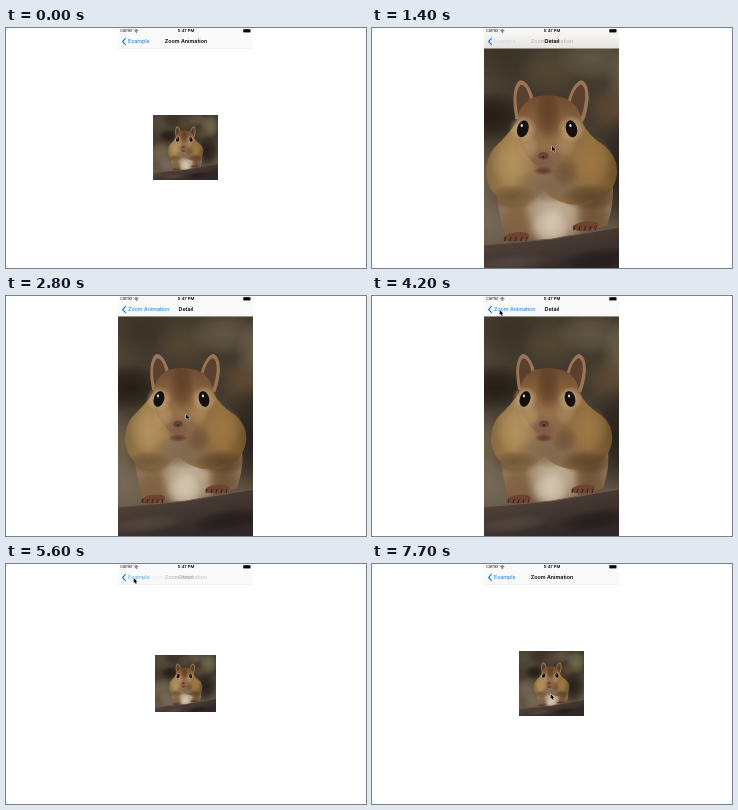
Write an HTML page with a canvas that moves like this. It is 360 by 240 pixels and loops after 8000 ms.

```html
<!DOCTYPE html>
<html lang="en">
<head>
<meta charset="utf-8">
<title>Zoom Animation</title>
<style>
html, body { margin: 0; width: 100%; height: 100%; overflow: hidden; background: #fff; }
canvas { display: block; width: 360px; height: 240px; }
</style>
</head>
<body>
<canvas id="stage"></canvas>
<script>
const W = 360, H = 240, LOOP = 8000, STEP = 700;
const canvas = document.getElementById('stage');
const c = canvas.getContext('2d');
const dpr = window.devicePixelRatio || 1;
canvas.width = W * dpr;
canvas.height = H * dpr;

const FONT = 'Inter, Roboto, "Liberation Sans", sans-serif';
const BLUE = '#0a7aee';

function oval(x, y, rx, ry, fill, turn = 0) {
  c.fillStyle = fill;
  c.beginPath();
  c.ellipse(x, y, rx, ry, turn, 0, Math.PI * 2);
  c.fill();
}

// Soft spot: rgb fading to transparent at the rim
function glow(x, y, rx, ry, rgb, a = 1, turn = 0) {
  c.save();
  c.translate(x, y);
  c.rotate(turn);
  c.scale(rx, ry);
  const g = c.createRadialGradient(0, 0, 0, 0, 0, 1);
  g.addColorStop(0, `rgba(${rgb},${a})`);
  g.addColorStop(0.55, `rgba(${rgb},${a * 0.65})`);
  g.addColorStop(1, `rgba(${rgb},0)`);
  c.fillStyle = g;
  c.fillRect(-1, -1, 2, 2);
  c.restore();
}

function shape(path, fill) {
  c.fillStyle = fill;
  c.fill(new Path2D(path));
}

function fade(x0, y0, x1, y1, ...stops) {
  const g = c.createLinearGradient(x0, y0, x1, y1);
  stops.forEach((s, i) => g.addColorStop(i / (stops.length - 1), s));
  return g;
}

function backdrop() {
  c.fillStyle = fade(0, 20, 0, 240, '#443b2f', '#43392d', '#5a4e3e', '#6a5d4c');
  c.fillRect(69, 19, 222, 222);
  glow(85, 45, 60, 45, '88,82,60', 0.7);
  glow(135, 34, 38, 28, '58,50,38', 0.9);
  glow(178, 48, 30, 24, '88,74,54', 0.7);
  glow(218, 38, 36, 22, '104,92,74', 0.8);
  glow(262, 58, 34, 40, '122,118,84', 0.8);
  glow(124, 92, 36, 24, '34,27,20', 0.9);
  glow(238, 84, 26, 24, '98,74,52', 0.8);
  glow(250, 142, 44, 54, '38,32,27', 1);
  glow(96, 150, 44, 40, '120,108,82', 0.8);
  glow(118, 188, 34, 30, '124,110,92', 0.8);
}

function log() {
  shape('M69 218 L112 211 L180 205 L247 193 L291 185 V241 H69Z',
    fade(170, 200, 180, 241, '#4e4038', '#40342f', '#302827'));
  c.strokeStyle = '#6b5a4e';
  c.lineWidth = 1;
  c.stroke(new Path2D('M69 218 L112 211 L180 205 L247 193 L291 185'));
  glow(140, 228, 40, 9, '96,84,76', 0.5, -0.12);
  glow(222, 224, 40, 11, '32,25,23', 0.7, -0.15);
}

function ear(x, turn) {
  c.save();
  c.translate(x, 73);
  c.rotate(turn);
  shape('M-9 20 Q-11 -8 -2 -15 Q5 -16 9 -1 Q11 12 9 22Z', '#9a7555');
  shape('M-6 16 Q-8 -5 -1 -11 Q4 -11 6 1 Q7 12 6 18Z', '#59402f');
  c.restore();
}

function eye(x, y, turn) {
  glow(x, y, 13, 13, '196,165,122', 0.95);
  oval(x, y, 5.2, 8, '#14100f', turn);
  oval(x - 1, y - 3, 1.1, 1.4, '#d9d6d0');
}

function paw(x, y) {
  oval(x, y, 12, 4.3, '#6d4430', -0.12);
  c.strokeStyle = '#33201a';
  c.lineWidth = 1;
  for (let i = -2; i < 3; i++) {
    c.beginPath();
    c.moveTo(x + i * 5, y);
    c.lineTo(x + i * 5 - 1, y + 4);
    c.stroke();
  }
}

function animal() {
  // Trunk, pale chest and forelegs
  shape('M126 145 Q130 180 137 204 L162 207 L206 200 L231 192 Q240 165 234 145Z',
    fade(0, 150, 0, 207, '#87694a', '#8f7456', '#75593f'));
  glow(182, 183, 30, 34, '202,188,165', 0.95);
  glow(178, 194, 18, 18, '220,208,188', 0.7);
  glow(146, 190, 15, 24, '128,98,64', 0.9);
  glow(218, 182, 17, 24, '112,82,54', 0.95);

  // Cheek pouches around the muzzle
  shape('M148 96 Q138 110 126 121 Q119 130 119 144 Q120 163 138 172 Q157 176 172 160 ' +
    'Q188 176 213 173 Q236 168 240 146 Q242 130 229 119 Q214 110 207 96Z',
    fade(119, 0, 242, 0, '#86693f', '#a28250', '#96754c', '#8d6b42', '#93703e', '#6b4e2a'));
  glow(143, 134, 20, 25, '184,150,100', 0.75);
  glow(217, 132, 20, 22, '160,122,70', 0.75);
  glow(178, 156, 38, 17, '126,104,80', 0.85);
  glow(143, 166, 24, 12, '96,74,48', 0.75);
  glow(216, 166, 28, 13, '82,59,37', 0.8);
  glow(192, 143, 14, 14, '104,78,54', 0.7);

  ear(153, -0.1);
  ear(205, 0.22);

  // Head
  shape('M147 104 Q146 83 162 74 Q179 69 195 76 Q210 86 207 105 Q203 121 187 135 ' +
    'Q175 145 162 134 Q149 121 147 104Z',
    fade(0, 70, 0, 142, '#6c4a30', '#85603c', '#94704a', '#806148'));
  glow(176, 90, 13, 25, '88,56,34', 0.75);
  glow(157, 119, 11, 14, '180,146,100', 0.85);
  glow(193, 117, 11, 13, '170,134,90', 0.85);
  eye(153, 103, 0.3);
  eye(198, 103, -0.25);
  glow(172, 134, 11, 13, '128,90,70', 0.9);
  oval(172, 128, 5, 3.6, '#684438');
  oval(172, 129, 1.2, 0.9, '#321c19');
  glow(172, 142, 10, 4, '78,52,40', 0.8);
}

// Square picture 220 wide in its own space, zoomed about its middle
function photo(cy, scale, x, y, w, h) {
  c.save();
  c.beginPath();
  c.rect(x, y, w, h);
  c.clip();
  c.translate(179.5, cy);
  c.scale(scale, scale);
  c.translate(-179.5, -130);
  backdrop();
  animal();
  log();
  paw(147, 203);
  paw(211, 193);
  c.restore();
}

function text(str, x, y, size, color, weight = 400, align = 'left', alpha = 1) {
  c.globalAlpha = alpha;
  c.font = `${weight} ${size}px ${FONT}`;
  c.textAlign = align;
  c.textBaseline = 'alphabetic';
  c.fillStyle = color;
  c.fillText(str, x, y);
  c.globalAlpha = 1;
}

const title = (str, alpha = 1, x = 180) => text(str, x, 15.4, 5.35, '#000', 600, 'center', alpha);
const back = (str, alpha = 1, x = 122) => text(str, x, 15.4, 5.4, BLUE, 400, 'left', alpha);

function chevron(alpha = 1) {
  c.globalAlpha = alpha;
  c.strokeStyle = BLUE;
  c.lineWidth = 1.1;
  c.stroke(new Path2D('M119.7 10.2 L116.6 13.5 L119.7 16.8'));
  c.globalAlpha = 1;
}

function bar(fill = '#f9f9f9') {
  c.fillStyle = fill;
  c.fillRect(112, 0, 135, 20);
  c.fillStyle = '#e3e3e3';
  c.fillRect(112, 20, 135, 0.5);
  text('Carrier', 114, 4.3, 3.8, '#111');
  text('5:47 PM', 180, 4.3, 4.1, '#000', 600, 'center');
  c.strokeStyle = '#111';
  c.lineWidth = 0.7;
  for (const r of [1.4, 2.7]) {
    c.beginPath();
    c.arc(130.3, 4.5, r, -Math.PI * 0.76, -Math.PI * 0.24);
    c.stroke();
  }
  oval(130.3, 4.2, 0.5, 0.5, '#111');
  c.fillStyle = '#000';
  c.fillRect(237.3, 1.2, 7, 3.2);
  c.fillRect(244.5, 2.2, 0.5, 1.2);
}

function pointer(x, y) {
  c.save();
  c.translate(x, y);
  const p = new Path2D('M0 0 V5 L1.2 4 L2.1 6 L3 5.6 L2.1 3.7 H3.7Z');
  c.strokeStyle = '#fff';
  c.lineWidth = 0.7;
  c.stroke(p);
  c.fillStyle = '#000';
  c.fill(p);
  c.restore();
}

function home() {
  photo(119.5, 65 / 220, 147, 87, 65, 65);
  bar();
  chevron();
  back('Example');
  title('Zoom Animation');
}

function detail(zoom, fill) {
  photo(130, zoom, 112, 20, 135, 220);
  bar(fill);
}

function opening() {
  // The picture shows faintly through the bar
  detail(1.08, fade(0, 0, 0, 20, '#f9f9f9', '#f3f1ef', '#e6e2de'));
  chevron();
  back('Example', 0.18);
  title('Zoom Animation', 0.2);
  title('Detail', 0.95);
}

function opened(alpha = 1) {
  detail(1);
  chevron(alpha);
  back('Zoom Animation', alpha);
  title('Detail');
}

function closing() {
  photo(119.5, 61 / 220, 149, 91, 61, 57);
  bar();
  chevron();
  back('Example', 0.65);
  back('Zoom Animation', 0.12, 142);
  title('Zoom Animation', 0.18);
  title('Detail', 0.18);
}

const pressed = () => opened(0.25);

// One scene per step, with the pointer's tip
const scenes = [
  [home],
  [home, 180, 118],
  [opening, 180, 118],
  [opened, 180, 118],
  [opened, 180, 118],
  [opened, 152, 62],
  [opened, 127.7, 14],
  [pressed, 127.7, 14],
  [closing, 127.7, 14],
  [home, 127.7, 14],
  [home, 160, 88],
  [home, 178.7, 130]
];

function draw(t) {
  const [scene, x, y] = scenes[Math.floor(t / STEP)];
  c.setTransform(dpr, 0, 0, dpr, 0, 0);
  c.fillStyle = '#fff';
  c.fillRect(0, 0, W, H);
  scene();
  if (x) pointer(x, y);
}

const start = performance.now();
function tick() {
  draw((performance.now() - start) % LOOP);
  requestAnimationFrame(tick);
}
tick();
</script>
</body>
</html>
```
